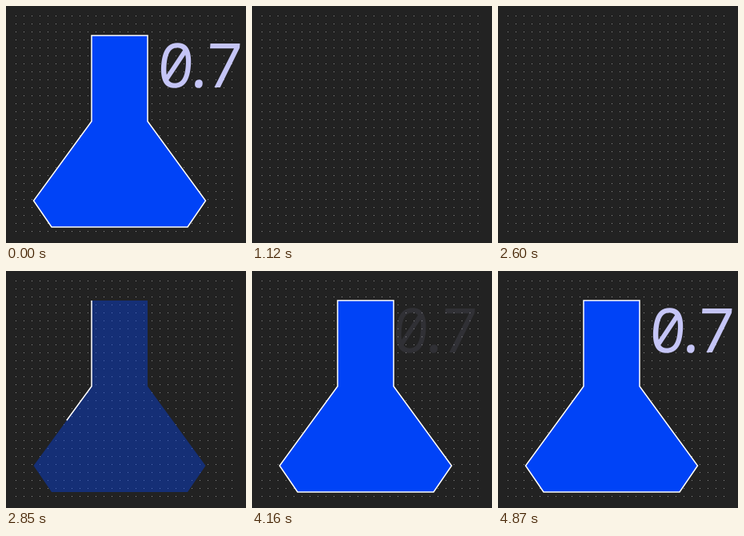
An HTML page that plays this animation: 300x297 px, repeating every 6460 ms.

```html
<!DOCTYPE html>
<html lang="en">
<head>
<meta charset="utf-8">
<title>Flask 0.7</title>
<style>
  html, body { margin: 0; width: 100%; height: 100%; overflow: hidden; background: #222; }
  svg { display: block; width: 300px; height: 297px; }
  text { font: 500 77px "Noto Sans Mono", monospace; text-anchor: middle; fill: #c5c5f6; }
</style>
</head>
<body>
<svg viewBox="0 0 300 297">
  <defs>
    <pattern id="dots" width="10" height="10" patternUnits="userSpaceOnUse">
      <rect x="2" y="2" width="1" height="1" fill="#888"/>
    </pattern>
  </defs>
  <rect width="300" height="297" fill="#222"/>
  <rect x="10" y="10" width="280" height="280" fill="url(#dots)"/>
  <path id="fill" fill="#0043f7"/>
  <path id="edge" fill="none" stroke="#fff" stroke-width="1.5"/>
  <g id="bars" stroke="#fff" stroke-width="2"></g>
  <g id="label">
    <text transform="translate(0 75) skewX(-4) translate(0 -75)" x="212.5 242.5 272" y="102.5">0.7</text>
  </g>
</svg>
<script>
const LOOP = 6460;
const SHAPE = 'M107 37V144.5L34.5 244L57 277H227L249.5 244L177 144.5V37Z';
const $ = id => document.getElementById(id);
const fill = $('fill'), edge = $('edge'), label = $('label');
fill.setAttribute('d', SHAPE);
edge.setAttribute('d', SHAPE);
const LEN = edge.getTotalLength();

// Vertical cuts through the flask, left to right
const spans = [[234, 255], [199, 275], [164, 275], [39, 275], [39, 275],
               [39, 275], [172, 275], [206, 275], [239, 252]];
const bars = spans.map(([top, bottom], i) => {
  const bar = document.createElementNS('http://www.w3.org/2000/svg', 'path');
  bar.setAttribute('d', `M${44.5 + 25 * i} ${top}V${bottom}`);
  $('bars').append(bar);
  return bar;
});

const clamp = v => Math.min(1, Math.max(0, v));
const bez = (s, a, b) => 3 * (1 - s) * (1 - s) * s * a + 3 * (1 - s) * s * s * b + s * s * s;

// cubic-bezier(.25, .1, .25, 1)
function ease(x) {
  if (x <= 0 || x >= 1) return clamp(x);
  let lo = 0, hi = 1;
  for (let i = 0; i < 24; i++) {
    const mid = (lo + hi) / 2;
    if (bez(mid, .25, .25) < x) lo = mid; else hi = mid;
  }
  return bez(lo, .1, 1);
}
const tween = (t, start, dur) => ease(clamp((t - start) / dur));

const show = (el, on) => el.setAttribute('visibility', on ? 'visible' : 'hidden');

// Visible stretch of the outline, as lengths along the path
function stretch(t) {
  if (t < 240) return [0, LEN];
  if (t < 1930) return [0, 0];
  if (t < 2210) return [0, 144 * Math.min(3, 1 + Math.floor((t - 1930) / 40))];
  if (t < 2420) return [175, LEN];
  if (t < 2600) return [208, 270];
  return [0, LEN * tween(t, 2705, 915)];
}

function render(t) {
  const [from, to] = stretch(t);
  show(edge, to > from);
  edge.setAttribute('stroke-dasharray',
    to - from >= LEN ? 'none' : `0 ${from} ${to - from} ${LEN}`);

  fill.setAttribute('opacity', t < 240 ? 1 : tween(t, 2705, 600));

  bars.forEach((bar, i) => show(bar, t >= 280 + 50 * i && t < 752 + 46 * i));

  const p = t < 240 ? 1 : tween(t, 4085, 800);
  label.setAttribute('opacity', p);
  label.setAttribute('transform', `translate(${-15 * (1 - p)} 0)`);
}

const start = performance.now();
function tick() {
  render((performance.now() - start) % LOOP);
  requestAnimationFrame(tick);
}
render(0);
requestAnimationFrame(tick);
</script>
</body>
</html>
```
